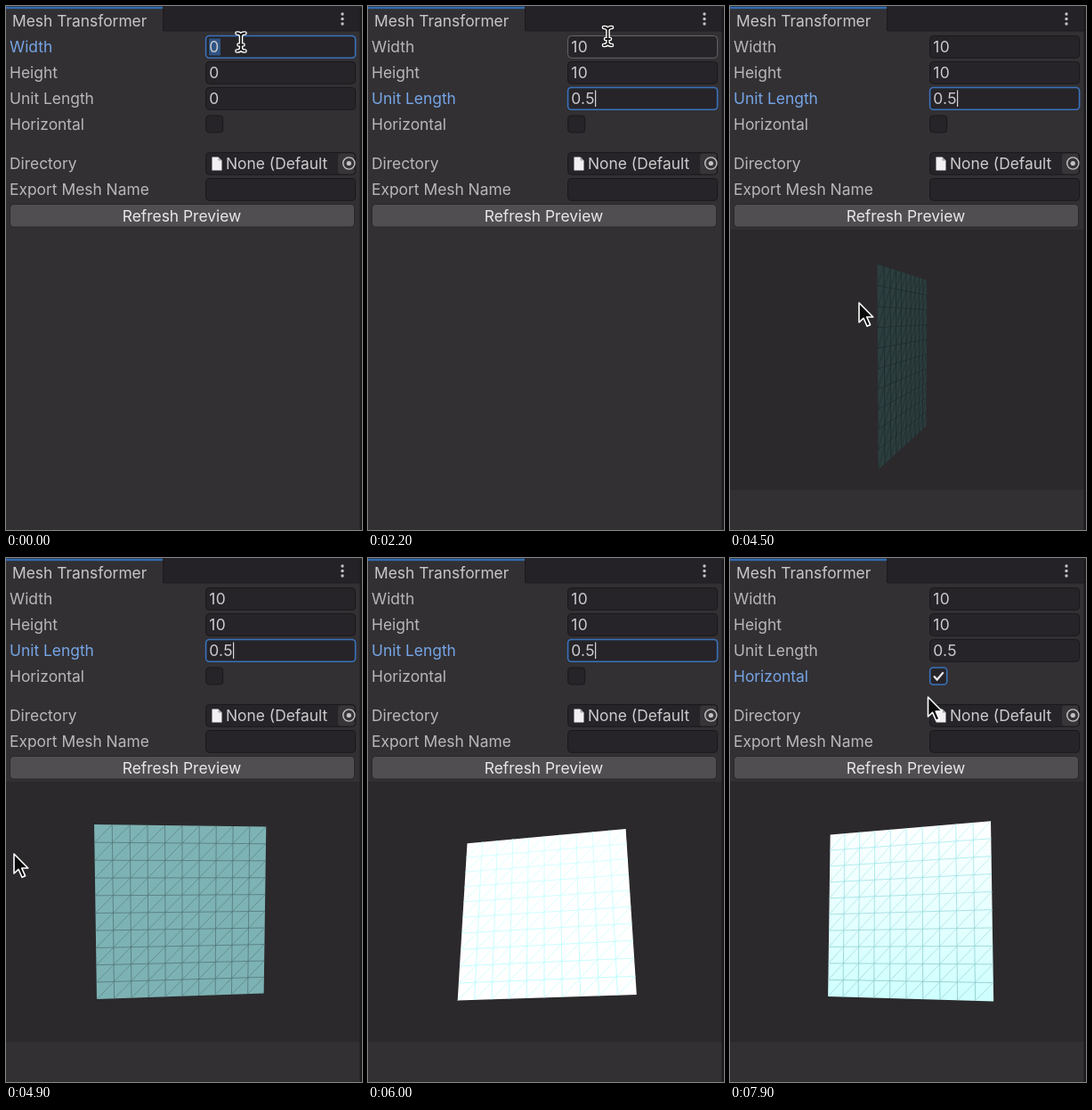
Recreate the animation shown at these times as an HTML page with a canvas. Size 400 by 588 pixels, loop 8000 ms.

```html
<!DOCTYPE html>
<html lang="en">
<head>
<meta charset="utf-8">
<title>Mesh tool</title>
<style>
  html, body { margin: 0; width: 100%; height: 100%; overflow: hidden; background: #323033; }
  canvas, svg { position: absolute; left: 0; top: 0; display: block; }
  text { font: 17.4px Inter, sans-serif; fill: #b9b7ba; white-space: pre; }
  .title { fill: #c8c6c9; }
  .value { fill: #cdcbce; }
  .number { letter-spacing: .4px; }
  .strong { fill: #e8e6e9; text-anchor: middle; }
  .active { fill: #76a5e6; }
  .box { fill: #262428; stroke: #1a181b; }
  .hover { stroke: #676568; }
  .focus { stroke: #3a72bd; stroke-width: 1.6; }
</style>
</head>
<body>
<canvas id="view" width="400" height="588"></canvas>
<svg id="ui" width="400" height="588" viewBox="0 0 400 588"></svg>
<script>
const LOOP = 8000, STEP = 100, ROW = 29;
const PRESS = 3100, READY = 3200, CHECK = 7600;
const ui = document.getElementById('ui');
const ctx = document.getElementById('view').getContext('2d');

function add(tag, attrs, text, parent = ui) {
  const el = document.createElementNS('http://www.w3.org/2000/svg', tag);
  for (const k in attrs) el.setAttribute(k, attrs[k]);
  if (text !== undefined) el.textContent = text;
  parent.appendChild(el);
  return el;
}
const rect = (x, y, width, height, attrs) => add('rect', { x, y, width, height, ...attrs });
const label = (x, y, text, cls = '') => add('text', { x, y, class: cls }, text);
const box = y => rect(224.6, y + .5, 168, 24.8, { rx: 4, class: 'box' });
const show = (el, on) => el.setAttribute('visibility', on ? 'visible' : 'hidden');
const style = (el, ...names) => el.setAttribute('class', names.filter(Boolean).join(' '));
const clamp = (v, lo, hi) => Math.min(hi, Math.max(lo, v));

// Tab bar
rect(0, 0, 400, 28, { fill: '#242226' });
rect(0, 0, 176, 29, { fill: '#323033' });
rect(0, .8, 176, 2.4, { fill: '#2f6cb0' });
rect(176, 3, 1, 25, { fill: '#1c1a1d' });
rect(177, 27.5, 221, 1, { fill: '#1f1d20' });
rect(397.5, 2, 2.5, 586, { fill: '#1c1a1d' });
label(7, 22.5, 'Mesh Transformer', 'title');
for (const cy of [9, 14.5, 20]) add('circle', { cx: 378, cy, r: 1.7, fill: '#c4c2c5' });

// Number fields: name, typed value, time of focus
const fields = [['Width', '10', 200], ['Height', '10', 900], ['Unit Length', '0.5', 1400]]
  .map(([name, value, focus], i) => {
    const y = 33 + i * ROW;
    return {
      value, focus,
      label: label(4, y + 18.5, name),
      box: box(y),
      mark: rect(228, y + 3.5, 13, 19, { fill: '#2f5585' }),
      text: label(228.2, y + 18.5, '0', 'value number'),
      caret: rect(0, y + 3.5, 1.2, 18.5, { fill: '#d8d6d9' })
    };
  });

// Toggle
const toggleLabel = label(4, 138.5, 'Horizontal');
const toggle = rect(224.7, 123, 19, 19, { rx: 3.5, class: 'box' });
const tick = add('path', { d: 'M229 132.5l3.7 4 7-8.2', fill: 'none', stroke: '#e8e6e9', 'stroke-width': 2.2 });

// Object field, name field, button
label(4, 182.5, 'Directory');
box(164);
add('path', { d: 'M231.5 169.5h7l4 4v11h-11z', fill: '#f2f0f3' });
add('path', { d: 'M238.5 169.5v4h4z', fill: '#a9a7aa' });
label(247, 182.5, 'None (Default', 'value');
rect(373, 165.5, 18.5, 23, { rx: 3, fill: '#373538' });
add('circle', { cx: 385.3, cy: 176.5, r: 6.6, fill: 'none', stroke: '#c4c2c5', 'stroke-width': 1.4 });
add('circle', { cx: 385.3, cy: 176.5, r: 2.6, fill: '#c4c2c5' });
label(4, 211.5, 'Export Mesh Name');
box(193);
const button = rect(4.5, 222.5, 387, 25.5, { rx: 4, stroke: '#29272a' });
label(197.5, 241.5, 'Refresh Preview', 'strong');

// Pointers
const arrow = add('path', {
  d: 'M0 0V22L5 17.3 9 26.3 12.6 24.7 8.7 16H15.8Z',
  fill: '#0a0a0a', stroke: '#fff', 'stroke-width': 1.6, 'stroke-linejoin': 'round'
});
const beam = add('g', { fill: 'none', 'stroke-linecap': 'round' });
for (const [stroke, w] of [['#fff', 4.6], ['#111', 1.8]])
  add('path', {
    d: 'M-4.5-10Q0-10 0-6.5Q0-10 4.5-10M0-6.5V6.5M-4.5 10Q0 10 0 6.5Q0 10 4.5 10M-2.5 3H2.5',
    stroke, 'stroke-width': w
  }, undefined, beam);

// Key points: time, then x, y of the pointer
const path = [
  [2600, -8, 205], [3100, 200, 232], [3500, 265.5, 264.5], [3800, 265.5, 264.5],
  [4500, 145, 333], [4900, 9, 332], [5600, -14.5, 339], [6500, -60, 345],
  [7000, 113, 325], [7300, 231, 126], [CHECK, 231, 126], [7900, 222.5, 156]
];
// Key points: time, then yaw, pitch of the mesh
const turn = [
  [4000, 120, 20.3], [4500, 74, -5], [4900, 7.7, -4.7],
  [5400, -10.5, 20], [6100, -10.5, 20], [6500, -18, 5]
];

function at(keys, t) {
  const i = keys.findIndex(k => k[0] > t);
  if (i < 1) return keys.at(i).slice(1);
  const a = keys[i - 1], b = keys[i], k = (t - a[0]) / (b[0] - a[0]);
  return a.slice(1).map((v, j) => v + (b[j + 1] - v) * k);
}

// Square from -1 to 1 seen through a 30 degree lens
const RAD = Math.PI / 180;
function projector(yaw, pitch) {
  const ca = Math.cos(yaw * RAD), sa = Math.sin(yaw * RAD);
  const cp = Math.cos(pitch * RAD), sp = Math.sin(pitch * RAD);
  return (u, v) => {
    const z = u * sa, s = 96 / (1 + .177 * (v * sp + z * cp));
    return [198 + u * ca * s, 397.4 - (v * cp - z * sp) * s];
  };
}

// Teal surface, overexposed towards white as it turns to the light
function light(yaw, pitch, v) {
  const glow = clamp((8 - yaw) / 18, 0, 1);
  return Math.max(.35, Math.cos(yaw * RAD)) + glow * (.9 + .2 * v + .03 * (pitch - 5));
}
const teal = k => `rgb(${[125, 178, 180].map(c => Math.min(255, Math.round(c * k)))})`;

function drawMesh(t) {
  const [yaw, pitch] = at(turn, t), p = projector(yaw, pitch);
  const ring = [p(-1, 1), p(1, 1), p(1, -1), p(-1, -1)];
  const front = ring[1][0] > ring[0][0];
  const ys = ring.map(q => q[1]);
  const paint = k => {
    const g = ctx.createLinearGradient(0, Math.min(...ys), 0, Math.max(...ys));
    g.addColorStop(0, teal(k * light(yaw, pitch, 1)));
    g.addColorStop(1, teal(k * light(yaw, pitch, -1)));
    return g;
  };
  if (front) {
    ctx.fillStyle = paint(1);
    ctx.beginPath();
    ring.forEach(q => ctx.lineTo(...q));
    ctx.fill();
  }
  ctx.strokeStyle = front ? paint(.66) : 'rgba(20,18,21,.42)';
  ctx.lineWidth = .8;
  const line = (a, b, c, d) => { ctx.moveTo(...p(a, b)); ctx.lineTo(...p(c, d)); };
  ctx.beginPath();
  for (let i = front ? 1 : 0; i <= (front ? 9 : 10); i++) {
    const s = i / 5 - 1;
    line(s, -1, s, 1);
    line(-1, s, 1, s);
  }
  ctx.stroke();
  ctx.globalAlpha = .75;
  ctx.beginPath();
  for (let i = 0; i < 10; i++) {
    const s = i / 5;
    line(s - 1, -1, 1, 1 - s);
    if (i) line(-1, s - 1, 1 - s, 1);
  }
  ctx.stroke();
  ctx.globalAlpha = 1;
}

function drawFields(t) {
  const checked = t >= CHECK;
  const current = fields.filter((f, i) => !i || t >= f.focus).length - 1;
  fields.forEach((f, i) => {
    const on = i === current && !checked;
    const count = Math.round((t - f.focus - 200) / 150) + 1;
    const typed = t >= f.focus + 200;
    f.text.textContent = typed ? f.value.slice(0, count) : '0';
    style(f.label, on && 'active');
    style(f.box, 'box', on ? 'focus' : !i && t < 2300 && 'hover');
    show(f.mark, on && !typed);
    show(f.caret, on && typed);
    if (on) f.caret.setAttribute('x', 228.2 + f.text.getComputedTextLength());
  });
  style(toggleLabel, checked && 'active');
  style(toggle, 'box', checked && 'focus');
  show(tick, checked);
}

function drawPointer(t) {
  show(beam, t < 400 || (t >= 2200 && t < 2300));
  beam.setAttribute('transform', t < 400 ? 'translate(264 40.5)' : 'translate(269.5 34)');
  const [x, y] = at(path, t);
  show(arrow, t >= 2600);
  arrow.setAttribute('transform', `translate(${x} ${y})`);
  const over = t >= 2600 && x > 4 && y > 222 && y < 248;
  const pressed = t >= PRESS && t < READY;
  button.setAttribute('fill', pressed ? '#46607c' : over ? '#676568' : '#504e51');
}

function draw(t) {
  ctx.clearRect(0, 0, 400, 588);
  if (t >= READY) {
    ctx.fillStyle = '#2b292c';
    ctx.fillRect(0, 251, 398, 292);
    drawMesh(t);
  }
  drawFields(t);
  drawPointer(t);
}

const start = performance.now();
function frame() {
  const t = (performance.now() - start) % LOOP;
  draw(Math.floor(t / STEP) * STEP);
  requestAnimationFrame(frame);
}
frame();
</script>
</body>
</html>
```
